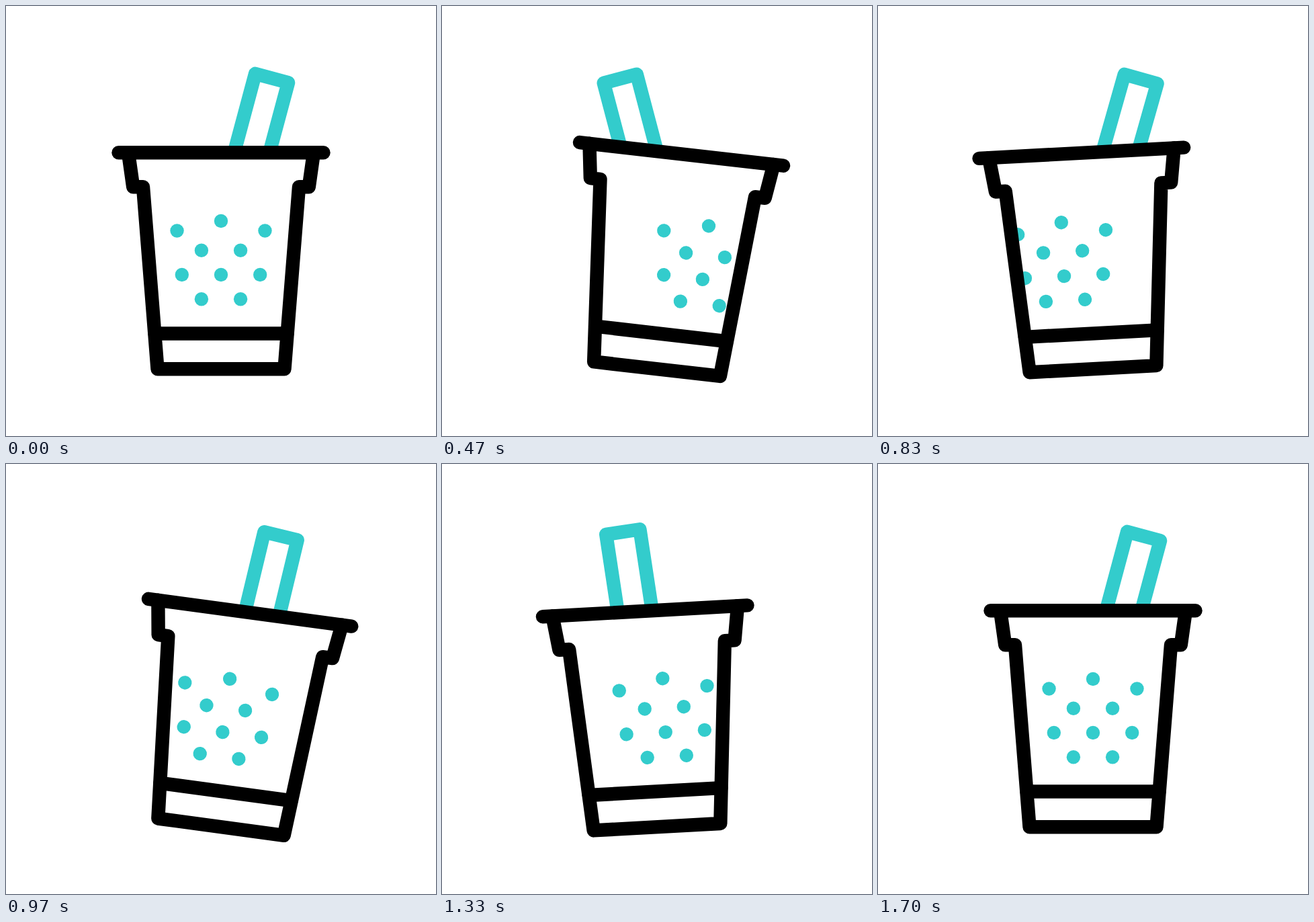
An HTML page for the animation above (2000 ms loop, 640 by 640 pixels).

```html
<!DOCTYPE html>
<html lang="en">
<head>
<meta charset="utf-8">
<title>Bubble tea</title>
<style>
  html, body { margin: 0; width: 100%; height: 100%; overflow: hidden; background: #fff; }
  svg { display: block; width: 100vw; height: 100vh; }
  .line { fill: none; stroke-width: 20.4; stroke-linecap: round; stroke-linejoin: round; }
</style>
</head>
<body>
<svg viewBox="0 0 640 640">
  <defs>
    <clipPath id="above"><rect x="-200" y="-200" width="1040" height="418"/></clipPath>
    <clipPath id="inside"><path d="M204 269L225.5 540.2H414.5L436 269L458 218H182Z"/></clipPath>
  </defs>
  <g id="cup">
    <g clip-path="url(#above)">
      <path id="straw" class="line" stroke="#33cccc" d="M295.6 386V97.6H346.4V386"/>
    </g>
    <g clip-path="url(#inside)">
      <g id="pearls" fill="#33cccc"></g>
    </g>
    <g class="line" stroke="#000">
      <path d="M167.5 218.3H472.5"/>
      <path d="M182 218.3L189.2 269.2H204L225.5 540.2H414.5L436 269.2H450.8L458 218.3"/>
      <path d="M221.5 487.5H418.5"/>
    </g>
  </g>
</svg>
<script>
  const LOOP = 2000;
  const REST = 1700;
  const FPS = 30;
  const GAP = 29.1;

  const find = id => document.getElementById(id);
  const cup = find('cup'), straw = find('straw'), pearls = find('pearls');

  function addPearl(x, y) {
    const dot = document.createElementNS('http://www.w3.org/2000/svg', 'circle');
    dot.setAttribute('cx', x);
    dot.setAttribute('cy', y);
    dot.setAttribute('r', 10.2);
    pearls.append(dot);
  }

  // A staggered block of pearls, topped by an arc of three.
  for (const side of [-1, 0, 1]) {
    addPearl(320 + side * GAP * 2, 400);
    addPearl(320 + side * GAP * 2.25, 320 + Math.abs(side) * GAP / 2);
    if (side) {
      addPearl(320 + side * GAP, 363.7);
      addPearl(320 + side * GAP, 436.3);
    }
  }

  // Turning points at an even pace: [time in ms, value].
  const beats = (start, step, ...values) => values.map((v, i) => [start + i * step, v]);

  const swing = [...beats(0, 340, 0, 15, -12.1, 9.1), [1405, -4.4], [REST, 0]];
  const tilt = [[0, 15], ...beats(490, 330, -21.5, 19, -12.6), [REST, 15]];
  const slosh = [...beats(0, 406, 0, 58, -36, 24), [REST, 0]];

  function valueAt(keys, t) {
    const next = keys.findIndex(key => key[0] > t);
    if (next < 0) return keys[keys.length - 1][1];
    const [t0, a] = keys[next - 1], [t1, b] = keys[next];
    const x = (t - t0) / (t1 - t0);
    return a + (b - a) * x * x * (3 - 2 * x);
  }

  // Poses change on a 30 fps grid rounded to 10 ms.
  function snap(ms) {
    const tens = Math.floor((ms % LOOP) / 10);
    return Math.floor(tens * FPS / 100 + 0.15) * 1000 / FPS;
  }

  function draw() {
    const t = snap(performance.now());
    cup.setAttribute('transform', `rotate(${valueAt(swing, t)} 320 540.2)`);
    straw.setAttribute('transform', `rotate(${valueAt(tilt, t)} 321 385.6)`);
    pearls.setAttribute('transform', `translate(${valueAt(slosh, t)} 0)`);
    requestAnimationFrame(draw);
  }
  draw();
</script>
</body>
</html>
```
